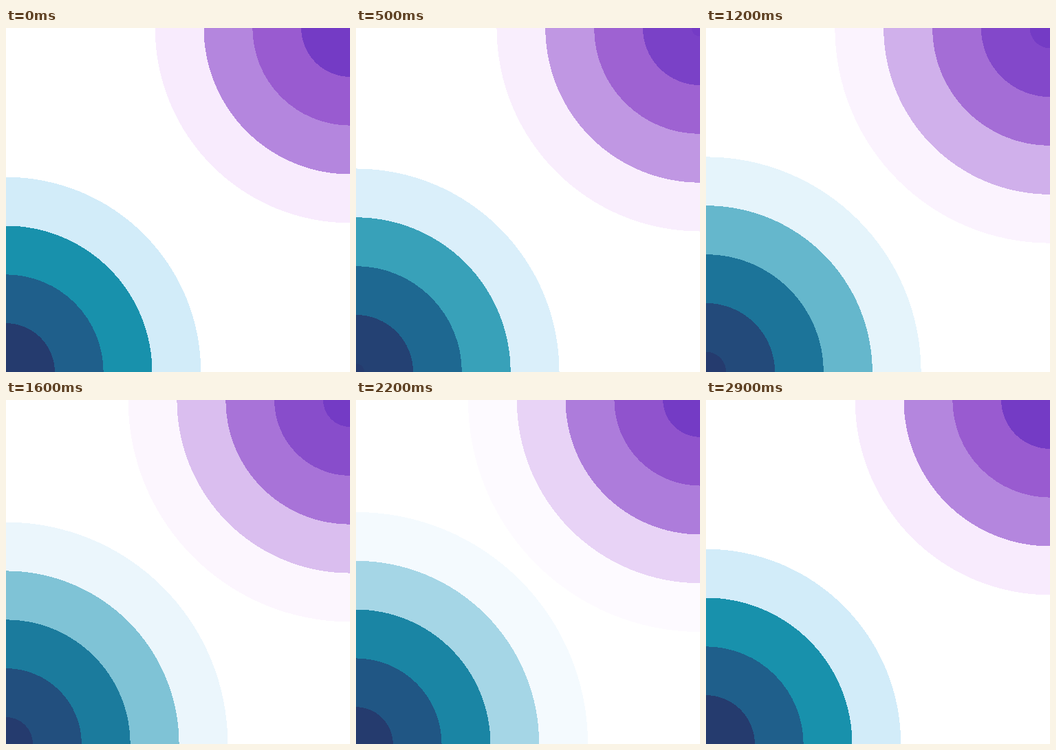
These frames come from a looping animation (500 px wide and 500 px high, 3000 ms). An HTML page:

```html
<!DOCTYPE html>
<html>
<head>
<meta charset="utf-8">
<style>
  html, body { margin: 0; height: 100%; overflow: hidden; background: #fff; }
  svg { display: block; }
</style>
</head>
<body>
<svg id="stage" width="500" height="500" shape-rendering="crispEdges"></svg>
<script>
const stage = document.getElementById('stage');
const LOOP = 3000, STEP = 100, LAST = LOOP / STEP - 1;
const RINGS = 4, GAP = 425 / 6;

const channels = hex => hex.match(/\w\w/g).map(c => parseInt(c, 16));

function mix(from, to, p) {
  const end = channels(to);
  return `rgb(${channels(from).map((c, i) => Math.round(c + (end[i] - c) * p))})`;
}

function addCircle(cx, cy) {
  const circle = document.createElementNS('http://www.w3.org/2000/svg', 'circle');
  circle.setAttribute('cx', cx);
  circle.setAttribute('cy', cy);
  return stage.appendChild(circle);
}

// Each ring grows by one gap and fades into the colour of the next one out
function makeRings(cx, cy, colors) {
  const circles = Array.from({ length: RINGS + 1 }, () => addCircle(cx, cy));
  return p => circles.forEach((circle, i) => {
    const ring = RINGS - i;
    circle.setAttribute('r', (ring + p) * GAP);
    circle.setAttribute('fill', mix(colors[Math.max(ring - 1, 0)], colors[ring], p));
  });
}

// Colours run from the centre outwards
const corners = [
  makeRings(500, 0, ['#743bc5', '#995bd0', '#b486de', '#f8ebfd', '#ffffff']),
  makeRings(0, 500, ['#253b6e', '#1f5f8b', '#1891ac', '#d2ecf9', '#ffffff']),
];

function draw() {
  const p = Math.floor(performance.now() % LOOP / STEP) / LAST;
  corners.forEach(update => update(p));
  requestAnimationFrame(draw);
}
draw();
</script>
</body>
</html>
```
